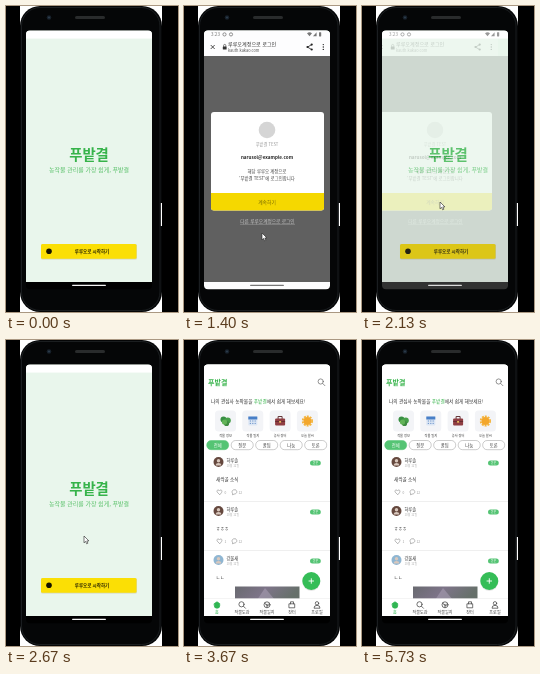
Recreate the animation shown at these times as an HTML page. Size 172x306 px, loop 5790 ms.

```html
<!DOCTYPE html>
<html lang="ko">
<head>
<meta charset="utf-8">
<title>App login</title>
<style>
html, body { margin: 0; width: 100%; height: 100%; overflow: hidden; background: #000; }
svg { display: block; width: 172px; height: 306px; }
text { font-family: "Noto Sans CJK KR", "Noto Sans CJK", "Noto Sans", sans-serif; }
.m { text-anchor: middle; }
.b { font-weight: 700; }
.line { fill: none; stroke-linecap: round; stroke-linejoin: round; }
.anim { animation: 5790ms linear infinite; }
#splash { animation-name: splash; }
#browser { animation-name: browser; }
#bar { animation-name: bar; }
.page { animation-name: page; }
#plain { animation-name: plain; }
#status { animation-name: status; }
#lightNav { animation-name: lightNav; }
#press { animation-name: press; }
#home { animation-name: home; }
#cursor { animation-name: cursor; }
@keyframes splash {
  0%, 33.3% { transform: none; }
  33.4% { transform: translateX(13px); }
  36.79% { transform: translateX(3px); }
  40.2%, 100% { transform: none; }
}
@keyframes browser {
  0%, 14.6% { opacity: 0; transform: none; }
  15.03% { opacity: .5; }
  15.9% { opacity: 1; }
  33.3% { opacity: 1; transform: none; }
  36.79% { opacity: .2; transform: translateX(-10px); }
  38.5%, 100% { opacity: 0; transform: translateX(-13px); }
}
@keyframes bar {
  0%, 15% { transform: scaleX(.14); opacity: 1; }
  16.1% { transform: scaleX(.21); }
  21% { transform: scaleX(.8); opacity: 1; }
  22.5%, 100% { transform: scaleX(1); opacity: 0; }
}
@keyframes page {
  0%, 21.2% { opacity: 0; }
  22.3%, 100% { opacity: 1; }
}
@keyframes plain {
  0%, 21.2% { opacity: 1; }
  21.3%, 100% { opacity: 0; }
}
@keyframes status {
  0%, 14.6% { opacity: 0; }
  15.9%, 35% { opacity: 1; }
  36.79% { opacity: .75; }
  40.2%, 100% { opacity: 0; }
}
@keyframes lightNav {
  0%, 14.6% { opacity: 0; }
  15.9%, 33.3% { opacity: 1; }
  36.79% { opacity: .2; }
  38.5%, 100% { opacity: 0; }
}
@keyframes press {
  0%, 25.4% { opacity: 0; }
  26.4%, 33.3% { opacity: .06; }
  34%, 100% { opacity: 0; }
}
@keyframes home {
  0%, 49.5% { opacity: 0; }
  50.5% { opacity: .3; }
  54%, 100% { opacity: 1; }
}
@keyframes cursor {
  0%, 4.6% { transform: translate(12px, 170px); animation-timing-function: ease-out; }
  13.8%, 17% { transform: translate(72px, 243px); animation-timing-function: ease-in-out; }
  23.5%, 24.9% { transform: translate(78px, 227px); }
  26.4%, 58.5% { transform: translate(78px, 196px); animation-timing-function: ease-in; }
  63.3%, 100% { transform: translate(149px, 232px); }
}
</style>
</head>
<body>
<svg viewBox="0 0 172 306">
  <defs>
    <clipPath id="screen"><rect x="20" y="24.6" width="126" height="258.6" rx="4"/></clipPath>
    <linearGradient id="photo" x2="1" y2=".2">
      <stop stop-color="#696a70"/><stop offset=".5" stop-color="#7d7488"/><stop offset="1" stop-color="#66706a"/>
    </linearGradient>
  </defs>
  <rect width="172" height="306"/>
  <rect x="14" width="142" height="306" fill="#fff"/>
  <rect x="14" y="0" width="142" height="306" rx="20" fill="#050607"/>
  <rect x="154.8" y="197" width="1.2" height="23" fill="#fff"/>
  <rect x="15.5" y="1.5" width="138.5" height="303" rx="18.5" fill="none" stroke="#25292b" stroke-width=".7"/>
  <circle cx="43" cy="11.5" r="2.3" fill="#17202a"/>
  <circle cx="43" cy="11.5" r="1" fill="#2c3d4e"/>
  <rect x="69" y="10" width="30" height="3" rx="1.5" fill="#292b2c"/>

  <g clip-path="url(#screen)">
    <rect x="20" y="24" width="126" height="260" fill="#000"/>
    <rect x="20" y="24" width="126" height="252" fill="#e9f6ec"/>
    <g id="splash" class="anim">
      <text x="83" y="153.8" class="m" font-size="14.4" font-weight="900" fill="#36b34a">푸밭결</text>
      <text x="83" y="166" class="m" font-size="6" fill="#5cc26c">농작물 관리를 가장 쉽게, 푸밭결</text>
      <rect x="35" y="238" width="96" height="15.5" rx="1.5" fill="#c9c39a" opacity=".6"/>
      <rect x="35" y="238" width="95.5" height="14.8" rx="1.5" fill="#fbdf05"/>
      <circle cx="43" cy="245.3" r="2.8" fill="#161300"/>
      <text x="86" y="247" class="m b" font-size="4.5" fill="#2b2600">루루오로 시작하기</text>
    </g>
    <rect x="20" y="24" width="126" height="8" fill="#fff"/>

    <g id="browser" class="anim">
      <rect x="20" y="24" width="126" height="252" fill="#fdfdfe"/>
      <path class="line" d="M27 39.3l3.4 3.4m0-3.4l-3.4 3.4" stroke="#222" stroke-width=".8"/>
      <rect x="38.8" y="40.5" width="3.8" height="3" rx=".5" fill="#333"/>
      <path class="line" d="M39.6 40.5v-1a1.1 1.1 0 0 1 2.2 0v1" stroke="#333" stroke-width=".6"/>
      <path class="line" d="M127.5 38.7l-4 2.4 4 2.4" stroke="#222" stroke-width=".8"/>
      <g fill="#222">
        <circle cx="127.7" cy="38.6" r="1.1"/><circle cx="123.5" cy="41" r="1.1"/><circle cx="127.7" cy="43.5" r="1.1"/>
        <circle cx="139.3" cy="38.6" r=".7"/><circle cx="139.3" cy="41" r=".7"/><circle cx="139.3" cy="43.4" r=".7"/>
      </g>
      <text id="plain" class="anim" x="45" y="42.6" font-size="3.9" fill="#333">kauth.kakao.com</text>
      <g transform="translate(20 48)"><rect id="bar" class="anim" width="126" height="1.2" fill="#47797c"/></g>
      <g class="page anim">
        <rect x="20" y="50" width="146" height="226" fill="#606060"/>
        <text x="44" y="40.4" font-size="5.1" fill="#333">루루오계정으로 로그인</text>
        <text x="44" y="46.3" font-size="3.9" fill="#555">kauth.kakao.com</text>
        <rect x="27" y="106" width="113" height="98.5" rx="3" fill="#fff"/>
        <circle cx="83" cy="124" r="8.3" fill="#d5d5d5"/>
        <text x="83" y="139.5" class="m" font-size="4.2" fill="#999">푸밭결 TEST</text>
        <text x="83" y="153" class="m b" font-size="4.6" fill="#222">narusol@example.com</text>
        <g class="m" font-size="4.4" fill="#444">
          <text x="83" y="167">해당 루루오 계정으로</text>
          <text x="83" y="174.2">'푸밭결 TEST'에 로그인합니다</text>
        </g>
        <path d="M27 187h113v14.5a3 3 0 0 1-3 3H30a3 3 0 0 1-3-3z" fill="#f5d800"/>
        <path id="press" class="anim" d="M27 187h113v14.5a3 3 0 0 1-3 3H30a3 3 0 0 1-3-3z"/>
        <text x="83" y="197.5" class="m" font-size="4.8" fill="#7a6b00">계속하기</text>
        <text x="83.5" y="217" class="m" font-size="4.7" fill="#c4c4c4">다른 루루오계정으로 로그인</text>
        <path d="M56 218.3h55" stroke="#aaa" stroke-width=".5"/>
      </g>
    </g>

    <g id="status" class="anim" fill="#777">
      <text x="27" y="30.2" font-size="4.6">3:23</text>
      <circle cx="40.5" cy="28.4" r="1.6" fill="none" stroke="#777" stroke-width=".8"/>
      <circle cx="47" cy="28.4" r="1.6" fill="none" stroke="#777" stroke-width=".8"/>
      <path d="M123 27.2q2.5-1.8 5 0l-2.5 3zM132.6 26.3v4h-3.6z"/>
      <rect x="135" y="26.2" width="2.2" height="4.2" rx=".4"/>
    </g>

    <rect x="66" y="278.7" width="34" height="1.3" rx=".65" fill="#f4f4f4"/>
    <g id="lightNav" class="anim">
      <rect x="20" y="276" width="126" height="8" fill="#fdfdfe"/>
      <rect class="page anim" x="66" y="278.7" width="34" height="1.3" rx=".65" fill="#777"/>
    </g>

    <g id="home" class="anim">
      <rect x="20" y="24" width="126" height="252" fill="#fff"/>
      <text x="24" y="45" class="b" font-size="7" fill="#36b34a">푸밭결</text>
      <g class="line" stroke="#666" stroke-width=".7"><circle cx="136.7" cy="41.5" r="2.6"/><path d="M138.7 43.5l2.2 2.2"/></g>
      <text x="27" y="63.3" font-size="4.7" fill="#333">나의 관심사 농작물을 <tspan fill="#36b34a">푸밭결</tspan>에서 쉽게 해보세요!</text>
      <g id="cards"></g>
      <g id="chips"></g>
      <g id="posts"></g>
      <rect x="51" y="246.5" width="64.5" height="13" fill="url(#photo)"/>
      <path d="M73 260l8-12 10 12z" fill="#a79db2" opacity=".6"/>
      <circle cx="127.3" cy="242" r="9" fill="#000" opacity=".1"/>
      <circle cx="127.3" cy="241" r="9" fill="#35bd57"/>
      <path class="line" d="M125 241h4.6m-2.3-2.3v4.6" stroke="#fff" stroke-width=".9"/>
      <rect x="20" y="258.5" width="126" height="17.5" fill="#fff"/>
      <path d="M20 258.5h126" stroke="#e4e4e4" stroke-width=".4"/>
      <g id="tabs"></g>
    </g>

    <g id="cursor" class="anim">
      <path d="M0 0v6.8l1.6-1.4 1.1 2.4 1.2-.6-1.1-2.3h2.1z" fill="#fff" stroke="#222" stroke-width=".6"/>
    </g>
  </g>
</svg>
<script>
const fill = (id, items, draw) => {
  document.getElementById(id).innerHTML = items.map(draw).join('');
};
const label = (x, y, size, color, str, cls = 'm') =>
  `<text x="${x}" y="${y}" class="${cls}" font-size="${size}" fill="${color}">${str}</text>`;

const cards = [
  ['작물 정보', '<circle cx="-2" cy="-1.5" r="3" fill="#388f43"/><circle cx="2.3" cy="-.5" r="3" fill="#479f4a"/><circle cx="1" cy="2.5" r="2.6" fill="#3f8a40"/><circle cx="-1" cy="1" r="2.6" fill="#62b357"/>'],
  ['작물 일지', '<rect x="-4.5" y="-4.5" width="9" height="9" rx="1" fill="#dce6f4"/><path d="M-4.5-4.5h9v3h-9z" fill="#487fc7"/><path d="M-3 0h6M-3 2.4h6" stroke="#6a93c9" stroke-dasharray="1.2"/>'],
  ['농사 장터', '<path d="M-2-2v-2.5h4V-2" fill="none" stroke="#65383a"/><rect x="-5" y="-2.5" width="10" height="7" rx="1" fill="#8f3d42"/><path d="M-5 .5h10" stroke="#5e292d" stroke-width=".8"/><path d="M-1 0h2v1.7h-2z" fill="#e5b95c"/>'],
  ['오늘 날씨', '<circle r="4.7" fill="none" stroke="#f4b43c" stroke-width="1.8" stroke-dasharray="2 1"/><circle r="3.9" fill="#f3a72c"/>']
];
fill('cards', cards, ([name, icon], i) => {
  const x = 41.5 + i * 27.3;
  return `<rect x="${x - 10.5}" y="70.5" width="21" height="21" rx="3.5" fill="#f3f4f7"/>
    <g transform="translate(${x} 81)">${icon}</g>${label(x, 96.7, 3.2, '#333', name)}`;
});

fill('chips', ['전체', '질문', '꿀팁', '나눔', '토론'], (name, i) => {
  const x = 22.7 + i * 24.5, on = !i;
  return `<rect x="${x}" y="100.5" width="22" height="9.2" rx="4.4" fill="${on ? '#55c474' : '#fff'}"
    stroke="${on ? '#55c474' : '#999'}" stroke-width=".5"/>${label(x + 11, 106.7, 4.3, on ? '#fff' : '#444', name)}`;
});

const reactions = n => `<g class="line" stroke="#999" stroke-width=".7">
    <path d="M35.5 154.5l-2.3-2.4c-1-2 1.4-3 2.3-1.1c.9-1.9 3.3-.9 2.3 1.1z"/>
    <path d="M48.5 154.4v-1.2a2.4 2.2 0 1 1 2 .9z"/>
  </g>${label(40.5, 153.7, 3.3, '#999', n, '')}${label(54.5, 153.7, 3.3, '#999', 12, '')}
  <path d="M20 161.5h126" stroke="#e5e5e5" stroke-width=".6"/>`;
const posts = [['하루솔', '새싹골 소식', '#65483e'], ['하루솔', 'ㅎㅎㅎ', '#65483e'], ['강물새', 'ㄴㄴ', '#8fb6d2']];
fill('posts', posts, ([name, body, color], i) => `<g transform="translate(0 ${i * 49})">
  <circle cx="34.5" cy="122" r="5" fill="${color}"/>
  <circle cx="34.5" cy="120.7" r="1.7" fill="#d9c8bd"/>
  <path d="M31.4 125.5a3.2 3.2 0 0 1 6.2 0z" fill="#d9c8bd"/>
  ${label(42.5, 122, 4.2, '#333', name, '')}
  ${label(42.5, 127, 2.9, '#aaa', '10월 12일', '')}
  <rect x="126" y="120.5" width="10.8" height="5" rx="2.5" fill="#55c474"/>
  ${label(131.4, 124.1, 2.9, '#fff', '질문')}
  ${label(32, 141, 4.6, '#333', body, '')}
  ${i < 2 ? reactions(i) : ''}</g>`);

const tabs = [
  ['홈', '<path d="M-2.7-1.2L0-3l2.7 1.8v2.4a2.7 2.2 0 0 1-5.4 0z" fill="#30b653" stroke="#30b653"/>'],
  ['작물도감', '<circle cx="-.5" cy="-.5" r="2.6"/><path d="M1.5 1.5l2 2"/>'],
  ['작물일지', '<circle r="3"/><path d="M0 2.5V-.5m0 1.5c2 0 2-1 2-2m-2 1c-2 0-2-1-2-2"/>'],
  ['장터', '<path d="M-2.7-1h5.4v4h-5.4zM-1.5-1v-2h3v2"/>'],
  ['프로필', '<circle cy="-1.5" r="1.7"/><path d="M-3 3a3 2.5 0 0 1 6 0z"/>']
];
fill('tabs', tabs, ([name, icon], i) => {
  const x = 33 + i * 25;
  return `<g class="line" transform="translate(${x} 264.8)" stroke="#444" stroke-width=".75">${icon}</g>
    ${label(x, 273.7, 4.1, i ? '#444' : '#30b653', name)}`;
});
</script>
</body>
</html>
```
